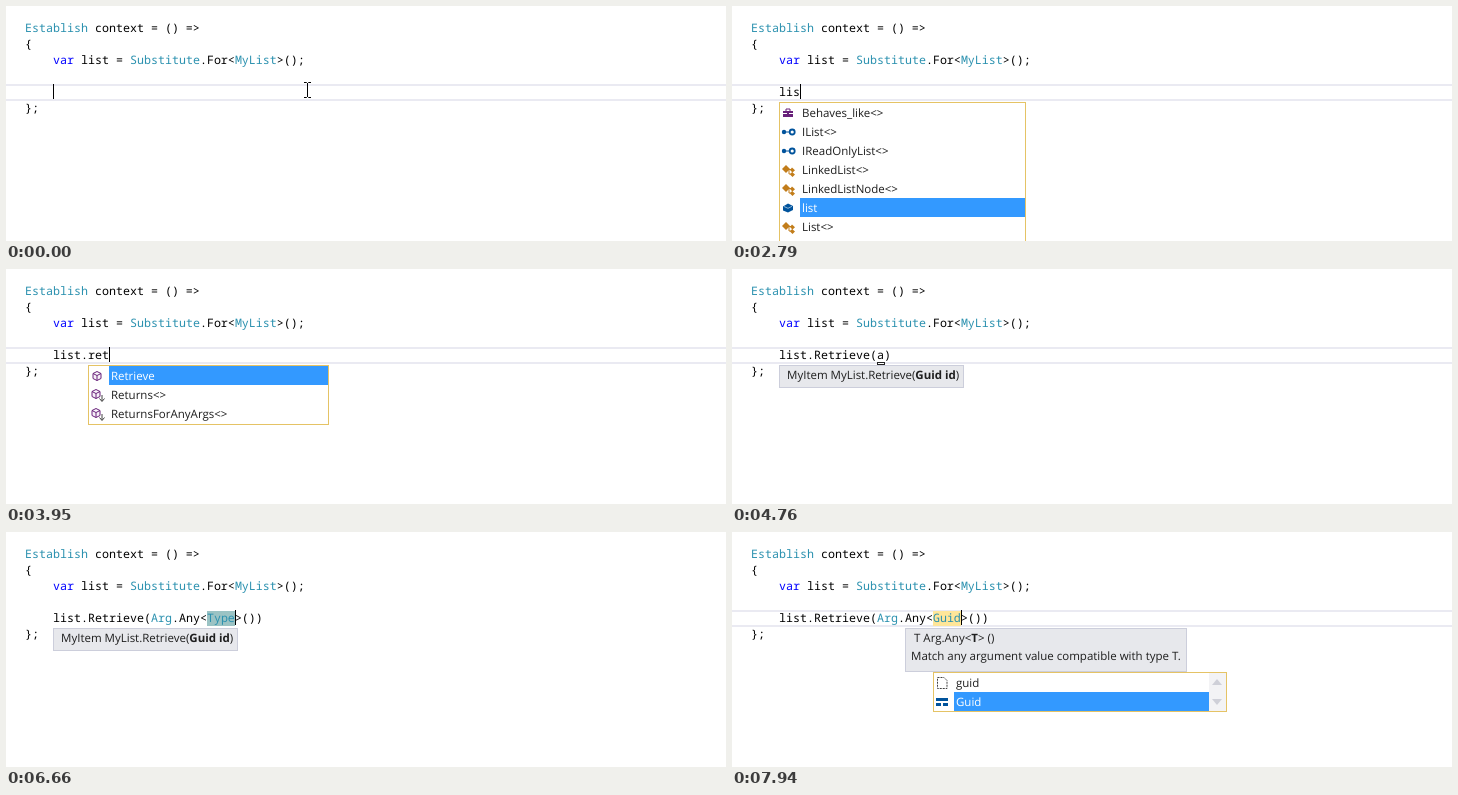
An HTML page that plays this animation: 720x235 px, repeating every 8000 ms.

```html
<!DOCTYPE html>
<html lang="en">
<head>
<meta charset="utf-8">
<title>Code completion</title>
<style>
  html, body { margin: 0; width: 100%; height: 100%; overflow: hidden; background: #fff; }
  svg { display: block; width: 720px; height: 235px; }
  text { white-space: pre; text-rendering: geometricPrecision; }
  .code { font: 11.667px "Noto Sans Mono", monospace; }
  .ui { font: 11.5px "Open Sans", "Noto Sans", sans-serif; fill: #1e1e1e; }
  .ui .b { font-weight: 700; }
  rect { shape-rendering: crispEdges; }
</style>
</head>
<body>
<svg id="stage" viewBox="0 0 720 235"></svg>
<script>
const LOOP = 8000, CH = 7, LEFT = 19, INDENT = 47, ROW = 19;
const BLUE = '#00539c', GOLD = '#c27d1a', PURPLE = '#68217a', GRAY = '#424242';

const esc = s => s.replace(/</g, '&lt;').replace(/>/g, '&gt;');
const rect = (x, y, w, h, fill, more = '') =>
  `<rect x="${x}" y="${y}" width="${w}" height="${h}" fill="${fill}" ${more}/>`;
const frame = (x, y, w, h, fill, line) =>
  rect(x, y, w, h, line) + rect(x + 1, y + 1, w - 2, h - 2, fill);
const path = (d, fill, stroke = 'none') =>
  `<path d="${d}" fill="${fill}" stroke="${stroke}"/>`;
const tint = s => s
  .replace(/\b(Establish|Substitute|MyList|Arg|Type|Guid)\b/g, '<tspan fill="#2b91af">$1</tspan>')
  .replace(/\bvar\b/, '<tspan fill="#0000ff">var</tspan>');
const code = (x, y, s, plain) =>
  `<text class="code" x="${x}" y="${y}">${plain ? esc(s) : tint(esc(s))}</text>`;
const ui = (x, y, html, fill = '#1e1e1e') =>
  `<text class="ui" x="${x}" y="${y}" style="fill:${fill}">${html}</text>`;

// Icons are drawn around their own centre.
const cube = path('M0-4.5L4-2.5V2.5L0 4.5L-4 2.5V-2.5ZM-4-2.5L0-.5L4-2.5M0-.5V4.5', '#f6f0f8', PURPLE);
const icons = {
  box: rect(-5, -2, 10, 6, PURPLE) + path('M-2-2V-4H2V-2', 'none', PURPLE) + rect(-5, 0, 10, 1, '#fff') + rect(-1, 0, 2, 2, PURPLE),
  face: `<circle cx="-4" cy="0" r="2.2" fill="${BLUE}"/>` + path('M-3 0H2', 'none', BLUE) +
    `<circle cx="4.2" cy="0" r="2.5" fill="#fff" stroke="${BLUE}" stroke-width="1.8"/>`,
  class: path('M-6-1L-2-5L2-1L-2 3Z', GOLD) + path('M0-.5H5M1 0V4H4', 'none', GOLD) +
    path('M4-2.5L7 .2L4.5 2.5L2 0ZM4 2L7 4.5L4.5 7L2 4.5Z', GOLD),
  local: path('M0-4.5L5-2V2L0 4.5L-5 2.5V-1.5Z', BLUE) + path('M-4-1.5L0 .3L4-1.7', 'none', '#8fb6d8'),
  method: cube,
  ext: `<g transform="translate(-1 -1)">${cube}</g>` + path('M5 0V6M2.5 3.5L5 6.5L7.5 3.5', 'none', GRAY),
  struct: rect(-6, -4, 12, 3, BLUE) + rect(-6, 1, 5, 3, BLUE) + rect(1, 1, 5, 3, BLUE),
  word: [[-6, -5, 4], [0, -5, 7], [-6, -2, 8], [4, -2, 3], [-6, 1, 3], [-1, 1, 8], [-6, 4, 10]]
    .map(([x, y, w]) => rect(x, y, w, 1, '#666')).join(''),
  snip: `<path d="M-4.5-5.5H2L5-2.5V5.5H-4.5Z" fill="#fff" stroke="${GRAY}" stroke-dasharray="2 1"/>`
};

function scrollBar(x, y, h, { thumb, off }) {
  const ink = off ? '#cfd0d8' : '#868999';
  let s = rect(x, y, 17, h, off ? '#f3f3f5' : '#e8e8ec') + path(`M${x + 3} ${y + 12}h10l-5 -6z`, ink);
  if (thumb) s += rect(x + 4, y + thumb, 9, 8, '#c2c3c9');
  if (off) s += path(`M${x + 3} ${y + h - 12}h10l-5 6z`, ink);
  return s;
}

function popup({ x, y, w, rows, sel, soft, bar, pad = 0 }) {
  const h = rows.length * ROW + 2 + pad;
  const fillW = w - 22 - (bar ? 17 : 0);
  let s = frame(x, y, w, h, '#fff', '#e5c365');
  rows.forEach((row, i) => {
    const [icon, label] = row.split(' '), top = y + 1 + i * ROW, hit = i === sel;
    if (hit) s += soft ? frame(x + 21, top, fillW, ROW, '#fff', '#3399ff')
                       : rect(x + 21, top, fillW, ROW, '#3399ff');
    s += `<g transform="translate(${x + 9} ${top + 10})">${icons[icon]}</g>`;
    s += ui(x + 23, top + 14, esc(label), hit && !soft ? '#fff' : undefined);
  });
  return bar ? s + scrollBar(x + w - 18, y + 1, h - 2, bar) : s;
}

const tips = {
  call: frame(47, 96, 185, 23, '#e7e8ec', '#cccedb') +
    ui(55, 110, 'MyItem MyList.Retrieve(<tspan class="b">Guid id</tspan>)'),
  any: frame(173, 96, 282, 44, '#e7e8ec', '#cccedb') +
    ui(182, 110, 'T Arg.Any&lt;<tspan class="b">T</tspan>&gt; ()') +
    ui(179, 128, 'Match any argument value compatible with type T.')
};

const names = { x: 47, y: 96, w: 247, sel: 5, rows: ['box Behaves_like<>', 'face IList<>', 'face IReadOnlyList<>',
  'class LinkedList<>', 'class LinkedListNode<>', 'local list', 'class List<>', 'class ListBase'] };
const members = { x: 82, y: 96, w: 241, pad: 1, sel: 0,
  rows: ['method Retrieve', 'ext Returns<>', 'ext ReturnsForAnyArgs<>'] };
const allMembers = { ...members, sel: 3, rows: ['method Equals', 'method GetHashCode', 'method GetType',
  ...members.rows, 'method ToString'] };
const types = { x: 145, y: 119, w: 255, sel: 4, soft: true, bar: { thumb: 24 },
  rows: ['class ArithmeticException', 'class Array', 'struct ArraySegment<>',
    'class ArrayTypeMismatchException', 'word as', 'class ASCIIEncoding', 'class AssemblyLoader'] };
const firstTypes = { ...types, sel: -1, bar: { thumb: 19 }, rows: ['class AccessViolationException',
  'face Action', 'face Action<>', 'class Activator', 'class AggregateException', 'class AppDomain', 'class Arg'] };
const guids = { x: 201, y: 140, w: 294, sel: 1, bar: { off: true }, rows: ['snip guid', 'struct Guid'] };

const call = arg => `list.Retrieve(${arg})`;
const any = type => call(`Arg.Any<${type}>()`);

// Each step changes only the listed parts; "at" is the caret column, "on" its opacity.
const steps = [
  [0, { text: '', at: 0, on: 1, lines: true, beam: [301, 84] }],
  [70, { on: .5 }], [180, { on: 0 }],
  [580, { on: .5, beam: [359, 81] }], [640, { beam: null }], [700, { on: 1 }],
  [1070, { on: 0 }], [1600, { on: 1 }], [2160, { on: 0 }],
  [2520, { text: 'l', at: 1, on: 1 }],
  [2680, { text: 'li', at: 2 }], [2740, { pop: names }],
  [2790, { text: 'lis', at: 3 }], [2850, { text: 'list', at: 4 }],
  [3090, { text: 'list.', at: 5, pop: null }], [3150, { pop: allMembers }],
  [3210, { text: 'list.r', at: 6 }], [3330, { text: 'list.re', at: 7 }],
  [3390, { text: 'list.ret', at: 8 }], [3450, { pop: members }],
  [3700, { on: 0 }], [3950, { on: 1 }],
  [4010, { text: 'list.Retrieve', at: 13, pop: null }],
  [4120, { text: call(''), at: 14 }], [4180, { tip: 'call' }],
  [4480, { on: 0 }],
  [4640, { text: call('a'), at: 15, on: 1 }], [4760, { on: 0, tag: true }],
  [4820, { on: 1, pop: firstTypes }],
  [5320, { on: 0 }], [5440, { on: 1, pop: types }],
  [5840, { text: call('an'), at: 16 }], [5960, { text: call('any'), at: 17 }],
  [6080, { pop: null }],
  [6320, { text: any('Type'), plain: true, at: 26, on: 0, lines: false, tag: false, mark: ['#9bc3c4', 4] }],
  [6430, { on: 1 }], [6660, { plain: false }],
  [6860, { tip: null, on: 0 }], [6960, { tip: 'any', hint: true }],
  [7110, { on: 1 }], [7350, { on: 0 }],
  [7410, { text: any('G'), at: 23, on: 1, lines: true, hint: false, mark: ['#ffe699', 1] }],
  [7560, { text: any('Gu'), at: 24, mark: ['#ffe699', 2] }],
  [7640, { text: any('Gui'), at: 25, mark: ['#ffe699', 3] }],
  [7720, { text: any('Guid'), plain: true, at: 26, mark: ['#ffe699', 4] }],
  [7780, { pop: guids }], [7940, { plain: false }]
];
let last = {};
const states = steps.map(([, change]) => last = { ...last, ...change });

function draw(s) {
  let out = rect(0, 0, 720, 235, '#fff');
  if (s.lines) out += rect(0, 78, 720, 2, '#eaeaf2') + rect(0, 93, 720, 2, '#eaeaf2');
  if (s.mark) out += rect(201, 79, s.mark[1] * CH, 15, s.mark[0]);
  out += code(LEFT, 26, 'Establish context = () =>') + code(LEFT, 42, '{') +
    code(INDENT, 58, 'var list = Substitute.For<MyList>();') +
    code(INDENT, 90, s.text, s.plain) + code(LEFT, 106, '};');
  if (s.hint) out += rect(250, 93, 7, 1, '#7fb9d6');
  out += rect(INDENT + s.at * CH, 78, 1, 15, '#000', `opacity="${s.on}"`);
  if (s.tip) out += tips[s.tip];
  if (s.tag) out += frame(145, 93, 8, 3, '#fff', '#222');
  if (s.pop) out += popup(s.pop);
  if (s.beam) {
    const [x, y] = s.beam;
    out += path(`M${x - 3} ${y - 7.5}h2.5l1 1l1 -1h2.5M${x + .5} ${y - 7}v14M${x - 3} ${y + 7.5}h2.5l1 -1l1 1h2.5`, 'none', '#000');
  }
  return out;
}

const stage = document.getElementById('stage');
const start = performance.now();
let shown = -1;
function tick() {
  const t = (performance.now() - start) % LOOP;
  const i = steps.findLastIndex(([at]) => at <= t);
  if (i !== shown) stage.innerHTML = draw(states[shown = i]);
  requestAnimationFrame(tick);
}
tick();
</script>
</body>
</html>
```
